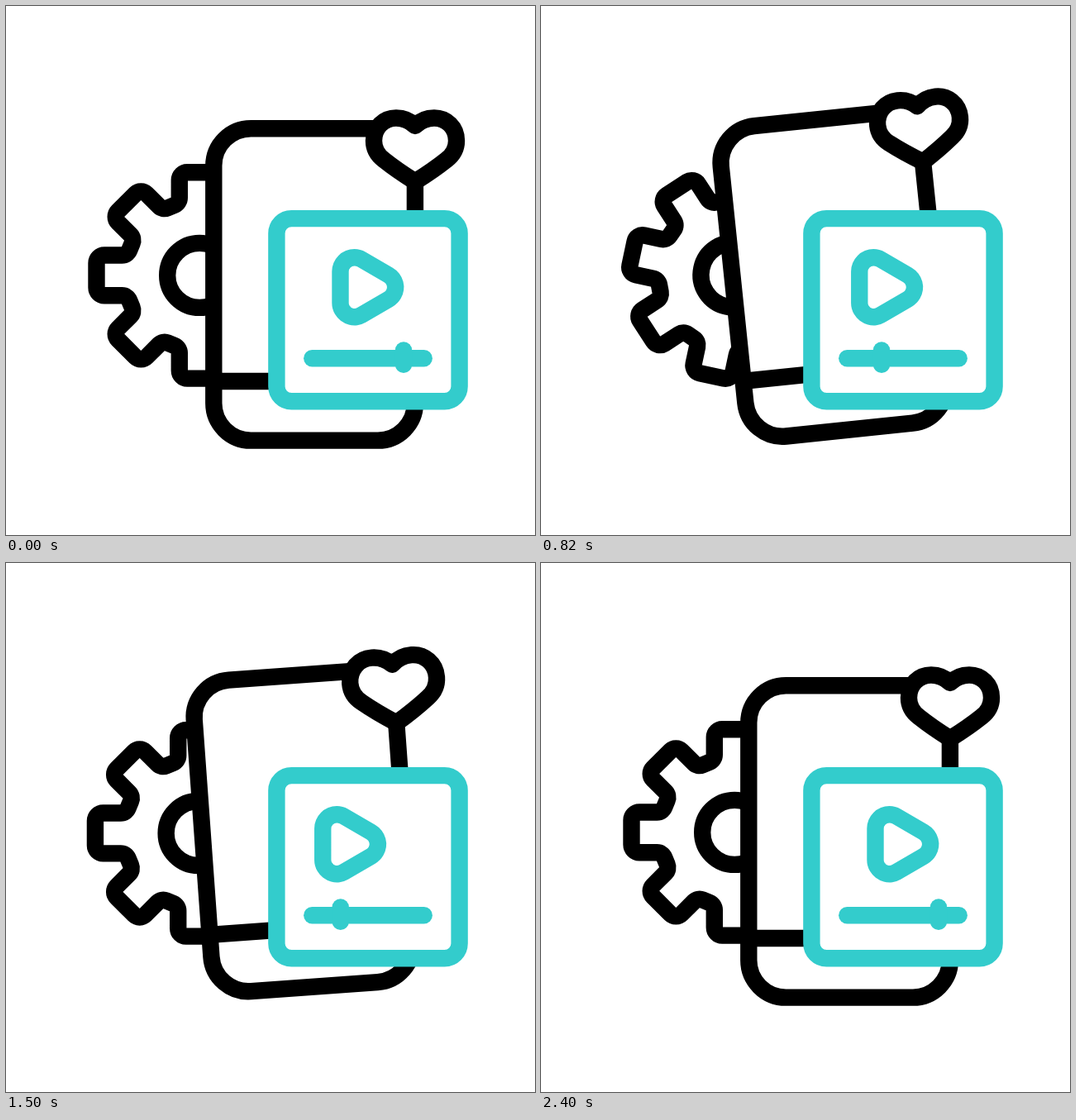
An HTML page with a canvas that plays this animation: 640 px wide and 640 px high, repeating every 2420 ms.

```html
<!DOCTYPE html>
<html lang="en">
<head>
<meta charset="utf-8">
<title>Video settings icon</title>
<style>
  html, body { margin: 0; width: 100%; height: 100%; overflow: hidden; background: #fff; }
  canvas { display: block; width: 640px; height: 640px; }
</style>
</head>
<body>
<canvas id="stage" width="640" height="640"></canvas>
<script>
const ctx = document.getElementById('stage').getContext('2d');
const BLACK = '#000', TEAL = '#33cccc', WHITE = '#fff';
const LOOP = 2420, STEP = 20, SPAN = 2400;

// [time, value] tables, eased between neighbours
const TILT = [[0, 0], [400, 6], [800, -6], [1200, 6], [1600, -6], [2000, 6], [2400, 0]];
const LIFT = [[0, 0], [400, -13], [2000, -13], [2400, 0]];
const HEART = [[0, 1], [400, 1.32], [800, 1], [1200, 1.32], [1600, 1], [2000, 1.32], [2400, 1]];
const SEEK = [[0, 0], [1200, 1], [2400, 0]];

const rad = deg => deg * Math.PI / 180;

function valueAt(keys, t) {
  const i = Math.max(1, keys.findIndex(k => k[0] >= t));
  const [t0, a] = keys[i - 1], [t1, b] = keys[i];
  const u = (t - t0) / (t1 - t0);
  return a + (b - a) * u * u * (3 - 2 * u);
}

function outline(color, fill) {
  if (fill) {
    ctx.fillStyle = fill;
    ctx.fill();
  }
  ctx.strokeStyle = color;
  ctx.lineWidth = 20.4;
  ctx.stroke();
}

function line(x1, y1, x2, y2, color) {
  ctx.beginPath();
  ctx.moveTo(x1, y1);
  ctx.lineTo(x2, y2);
  outline(color);
}

function box(x, y, w, h, r, color) {
  ctx.beginPath();
  ctx.roundRect(x, y, w, h, r);
  outline(color, WHITE);
}

function gearPath() {
  const tooth = [[-87.5, 24.4], [-124.7, 24.4], [-124.7, -24.4], [-87.5, -24.4]];
  const pts = [];
  for (let i = 0; i < 8; i++) {
    const c = Math.cos(rad(45 * i)), s = Math.sin(rad(45 * i));
    for (const [x, y] of tooth) pts.push([x * c - y * s, x * s + y * c]);
  }
  ctx.beginPath();
  ctx.moveTo(-106, 24.4);
  for (let i = 1; i <= pts.length; i++) {
    const p = pts[i % pts.length], q = pts[(i + 1) % pts.length];
    ctx.arcTo(p[0], p[1], q[0], q[1], 9.5);
  }
  ctx.closePath();
}

function drawGear(t) {
  ctx.save();
  ctx.translate(233.2, 326.1);
  ctx.rotate(rad(-360 * t / SPAN));
  ctx.translate(1, -0.2);
  gearPath();
  outline(BLACK);
  ctx.beginPath();
  ctx.arc(0, 0, 39, 0, 2 * Math.PI);
  outline(BLACK);
  ctx.restore();
}

function drawHeart(size) {
  ctx.save();
  ctx.translate(495, 172);
  ctx.scale(size, size);
  ctx.beginPath();
  ctx.moveTo(0, 40.5);
  ctx.bezierCurveTo(-12, 33, -28, 22, -38, 14);
  ctx.bezierCurveTo(-46, 8, -50, 0, -50, -9);
  ctx.bezierCurveTo(-50, -25, -38, -36.5, -23, -36.5);
  ctx.bezierCurveTo(-14, -36.5, -6, -33, 0, -27);
  ctx.bezierCurveTo(6, -33, 14, -36.5, 23, -36.5);
  ctx.bezierCurveTo(38, -36.5, 50, -25, 50, -9);
  ctx.bezierCurveTo(50, 0, 46, 8, 38, 14);
  ctx.bezierCurveTo(28, 22, 12, 33, 0, 40.5);
  ctx.closePath();
  ctx.restore();
  outline(BLACK, WHITE);
}

function drawPhone(t) {
  ctx.save();
  ctx.translate(373, 525 + valueAt(LIFT, t));
  ctx.rotate(rad(valueAt(TILT, t)));
  ctx.translate(-373, -525);
  box(251.3, 148.2, 243.6, 377.4, 45, BLACK);
  line(251.3, 454, 494.9, 454, BLACK);
  drawHeart(valueAt(HEART, t));
  ctx.restore();
}

function drawPlay(shift) {
  ctx.beginPath();
  ctx.moveTo(421.5 - shift, 321.2);
  ctx.lineTo(454.2 - shift, 340.2);
  ctx.lineTo(421.5 - shift, 359.2);
  ctx.closePath();
  for (const [color, width] of [[TEAL, 54.4], [WHITE, 13.6]]) {
    ctx.strokeStyle = ctx.fillStyle = color;
    ctx.lineWidth = width;
    ctx.stroke();
    ctx.fill();
  }
}

function drawPlayer(t) {
  const seek = valueAt(SEEK, t), knob = 481 - 90.4 * seek;
  box(327.4, 257.1, 221.2, 221.2, 18, TEAL);
  drawPlay(25.2 * seek);
  line(370.3, 426.2, 505.7, 426.2, TEAL);
  line(knob, 416.5, knob, 433.7, TEAL);
}

function draw(t) {
  ctx.fillStyle = WHITE;
  ctx.fillRect(0, 0, 640, 640);
  ctx.lineJoin = ctx.lineCap = 'round';
  drawGear(t);
  drawPhone(t);
  drawPlayer(t);
}

const start = performance.now();
function tick() {
  const time = performance.now() - start;
  draw(Math.floor(time % LOOP / STEP) * STEP);
  requestAnimationFrame(tick);
}
tick();
</script>
</body>
</html>
```
